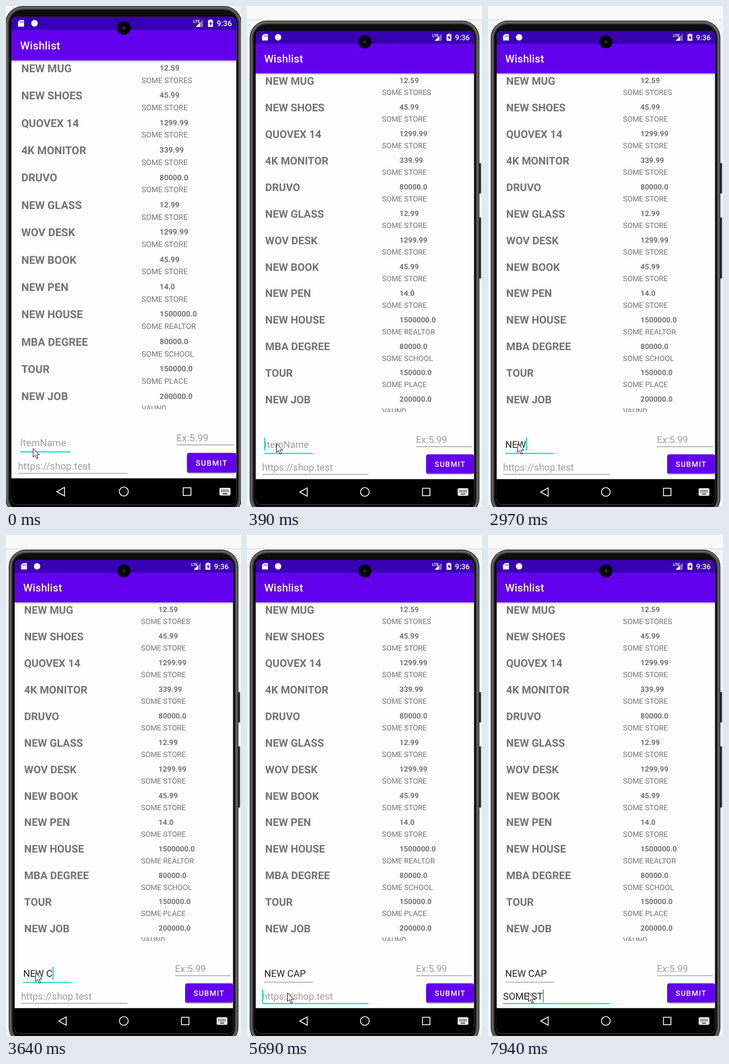
An HTML page that plays this animation: 433 by 923 pixels, repeating every 8 s.

```html
<!DOCTYPE html>
<html lang="en">
<head>
<meta charset="utf-8">
<title>Wishlist</title>
<style>
html, body { margin: 0; width: 100%; height: 100%; overflow: hidden; background: #f4f4f4; }
svg { display: block; width: 433px; height: 923px; }
text { font-family: Roboto, sans-serif; white-space: pre; text-rendering: geometricPrecision; }
.name { font-size: 20px; font-weight: 700; fill: #737373; }
.price { font-size: 14px; font-weight: 700; fill: #737373; }
.store { font-size: 14px; fill: #737373; }
.field { font-size: 18px; }
.hint { fill: #9e9e9e; }
.medium { font-weight: 500; fill: #fff; }
.nav { fill: none; stroke: #fff; stroke-width: 1.6; }
</style>
</head>
<body>
<svg viewBox="0 0 433 923">
  <defs>
    <linearGradient id="shade" x2="0" y2="1">
      <stop stop-color="#000" stop-opacity=".22"/>
      <stop offset="1" stop-color="#000" stop-opacity="0"/>
    </linearGradient>
    <radialGradient id="lens">
      <stop stop-color="#34404a"/>
      <stop offset=".5" stop-color="#14191d"/>
      <stop offset="1" stop-color="#050505"/>
    </radialGradient>
    <clipPath id="listArea"><rect y="80" width="411" height="637.5"/></clipPath>
    <clipPath id="screen"><rect width="411.2" height="892" rx="10"/></clipPath>
  </defs>

  <g id="desktop">
    <rect width="433" height="923" fill="#f4f4f4"/>
    <rect width="433" height="25" fill="#f9f9f9"/>
    <rect y="25" width="433" height="1" fill="#d2d2d2"/>
  </g>

  <!-- Device, measured in dp from the top left of its screen -->
  <g id="phone">
    <path d="M421 249h3.5v57H421zM421 351h3.5v115H421z" fill="#2a2a2a"/>
    <g id="bezel"></g>

    <g clip-path="url(#screen)">
      <rect width="412" height="892" fill="#fefefe"/>
      <g id="list" clip-path="url(#listArea)"></g>
      <rect y="80" width="412" height="4.5" fill="url(#shade)"/>
      <rect width="412" height="80" fill="#6200ee"/>
      <rect width="412" height="24" fill="#3700b3"/>
      <text class="medium" x="16" y="59.5" font-size="20" letter-spacing=".25">Wishlist</text>

      <path d="M15.5 6H23v12H12V9.5z" fill="#fff"/>
      <path d="M16 8v3M18.5 8v3M21 8v3" stroke="#3700b3"/>
      <circle cx="42.2" cy="12" r="6" fill="#fff"/>
      <path d="M337 18.5L350.5 5v13.5z" fill="#fff" opacity=".4"/>
      <path d="M337 18.5l8-8v8z" fill="#fff"/>
      <text x="332.5" y="10.8" font-size="7.5" font-weight="700" fill="#fff">LTE</text>
      <path d="M362 5h4v1.5h2.5v12h-9v-12h2.5z" fill="#fff"/>
      <path d="M365 8l-3.5 5h2.2v4l3.5-5.2H365z" fill="#3700b3"/>
      <text class="medium" x="375.5" y="17" font-size="14">9:36</text>

      <g id="itemField">
        <rect class="line" x="16" y="794.6" width="91.3"/>
        <text class="field" x="16" y="785.2"></text>
        <rect class="caret" y="765.8" width="2" height="24.4" fill="#03dac5"/>
      </g>
      <g id="linkField">
        <rect class="line" x="12" y="834.4" width="200.5"/>
        <text class="field" x="12" y="828"></text>
        <rect class="caret" y="808.8" width="2" height="24.4" fill="#03dac5"/>
      </g>
      <rect x="302.2" y="782.4" width="104.8" height="1" fill="#777"/>
      <text class="field hint" x="301.7" y="776">Ex:5.99</text>

      <rect x="320.5" y="799.5" width="92" height="36.5" rx="5" opacity=".12"/>
      <rect x="321" y="798.6" width="90.5" height="36.2" rx="4" opacity=".25"/>
      <rect x="321" y="797.4" width="90.2" height="36" rx="4" fill="#6200ee"/>
      <text class="medium" x="337" y="820.8" font-size="14" letter-spacing="1.25">SUBMIT</text>

      <rect y="844" width="412" height="48"/>
      <path class="nav" d="M83 868.3l14-7.8v15.6z"/>
      <circle class="nav" cx="205.6" cy="868.1" r="8.2"/>
      <rect class="nav" x="314.2" y="861.2" width="14" height="14"/>
      <rect x="380.5" y="861.3" width="20" height="14" rx="2" fill="#fff"/>
      <path d="M383.5 865.2h15M383.5 868.2h15" stroke="#000" stroke-width="1.8" stroke-dasharray="1.8 1.2"/>
      <path d="M386.2 872.2h8.6" stroke="#000" stroke-width="1.6"/>
    </g>
    <circle cx="205.7" cy="20.6" r="12.3" fill="#050505"/>
    <circle cx="205.7" cy="20.6" r="5" fill="url(#lens)"/>
  </g>

  <path id="mouse" d="M0 0v16l3.7-3.4L6.5 19l2.6-1.1-2.8-6.2h5.2z" fill="#fff" stroke="#111"/>
</svg>
<script>
const LOOP = 8000;
const $ = selector => document.querySelector(selector);

// Nested metal rims, from the outer edge inwards
const rims = [[0, "#242424"], [1.5, "#6b6b6b"], [4, "#484848"], [6.5, "#0c0c0c"]];
$("#bezel").innerHTML = rims.map(([inset, color]) => `
  <rect x="${inset - 11.2}" y="${inset - 19.4}" rx="${32 - inset}" fill="${color}"
    width="${432.5 - 2 * inset}" height="${931.4 - 2 * inset}"/>`).join("");

const items = [
  ["NEW MUG", "12.59", "SOME STORES"],
  ["NEW SHOES", "45.99"],
  ["QUOVEX 14", "1299.99"],
  ["4K MONITOR", "339.99"],
  ["DRUVO", "80000.0"],
  ["NEW GLASS", "12.99"],
  ["WOV DESK", "1299.99"],
  ["NEW BOOK", "45.99"],
  ["NEW PEN", "14.0"],
  ["NEW HOUSE", "1500000.0", "SOME REALTOR"],
  ["MBA DEGREE", "80000.0", "SOME SCHOOL"],
  ["TOUR", "150000.0", "SOME PLACE"],
  ["NEW JOB", "200000.0", "VAUND"]
];
$("#list").innerHTML = items.map(([name, price, store = "SOME STORE"], i) => `
  <g transform="translate(0 ${i * 50})">
    <text class="name" x="18" y="101.3">${name}</text>
    <text class="price" x="271" y="98.5">${price}</text>
    <text class="store" x="238" y="121">${store}</text>
  </g>`).join("");

// Each track lists [start time, value...]
const itemKeys = [1480, 1760, 1910, 3120, 3640, 4040, 4320];
const linkKeys = [6370, 6800, 7050, 7180, 7300, 7440, 7940];
const caretTrack = [[0, 0], [270, 1], [670, 0], [1230, 1], [2440, 0], [2970, 1], [3520, 0],
  [3640, 1], [4880, 0], [5390, 1], [6220, 0], [6370, 1]];
const mouseTrack = [[0, 50, 815], [120, 56, 822], [270, 54.5, 806.5], [5000, 64, 804],
  [5150, 72, 838], [5270, 77, 862], [5390, 74.5, 843.5]];

const at = (track, t) => track.findLast(step => step[0] <= t).slice(1);
const typed = (text, keys, t) => text.slice(0, keys.filter(k => k <= t).length);

function drawField(id, text, hint, { active, caretOn, pressed }) {
  const [line, label, caret] = $(id).children;
  label.textContent = text || hint;
  label.setAttribute("fill", text ? "#202020" : pressed ? "#757575" : "#9e9e9e");
  line.setAttribute("height", active ? 2 : 1);
  line.setAttribute("fill", active ? "#03dac5" : "#777");
  const end = text ? label.getComputedTextLength() : 0;
  caret.setAttribute("x", +label.getAttribute("x") + end);
  caret.setAttribute("visibility", caretOn ? "visible" : "hidden");
}

function draw(t) {
  const zoomed = t < 390;
  $("#phone").setAttribute("transform", zoomed
    ? "translate(10 19.8) scale(1.0076)"
    : "translate(16 46) scale(.9783)");
  $("#desktop").setAttribute("transform", zoomed ? "translate(0 -27) scale(1.03)" : "");

  const [blink] = at(caretTrack, t);
  const onLink = t >= 5690;
  const pressed = t >= 5540 && !onLink;
  drawField("#itemField", typed("NEW CAP", itemKeys, t), "ItemName",
    { active: !onLink, caretOn: blink && !onLink });
  drawField("#linkField", typed("SOME ST", linkKeys, t), "https://shop.test",
    { active: onLink || pressed, caretOn: blink && onLink, pressed });
  $("#mouse").setAttribute("transform", `translate(${at(mouseTrack, t)})`);
}

function tick() {
  draw(performance.now() % LOOP);
  requestAnimationFrame(tick);
}
tick();
</script>
</body>
</html>
```
